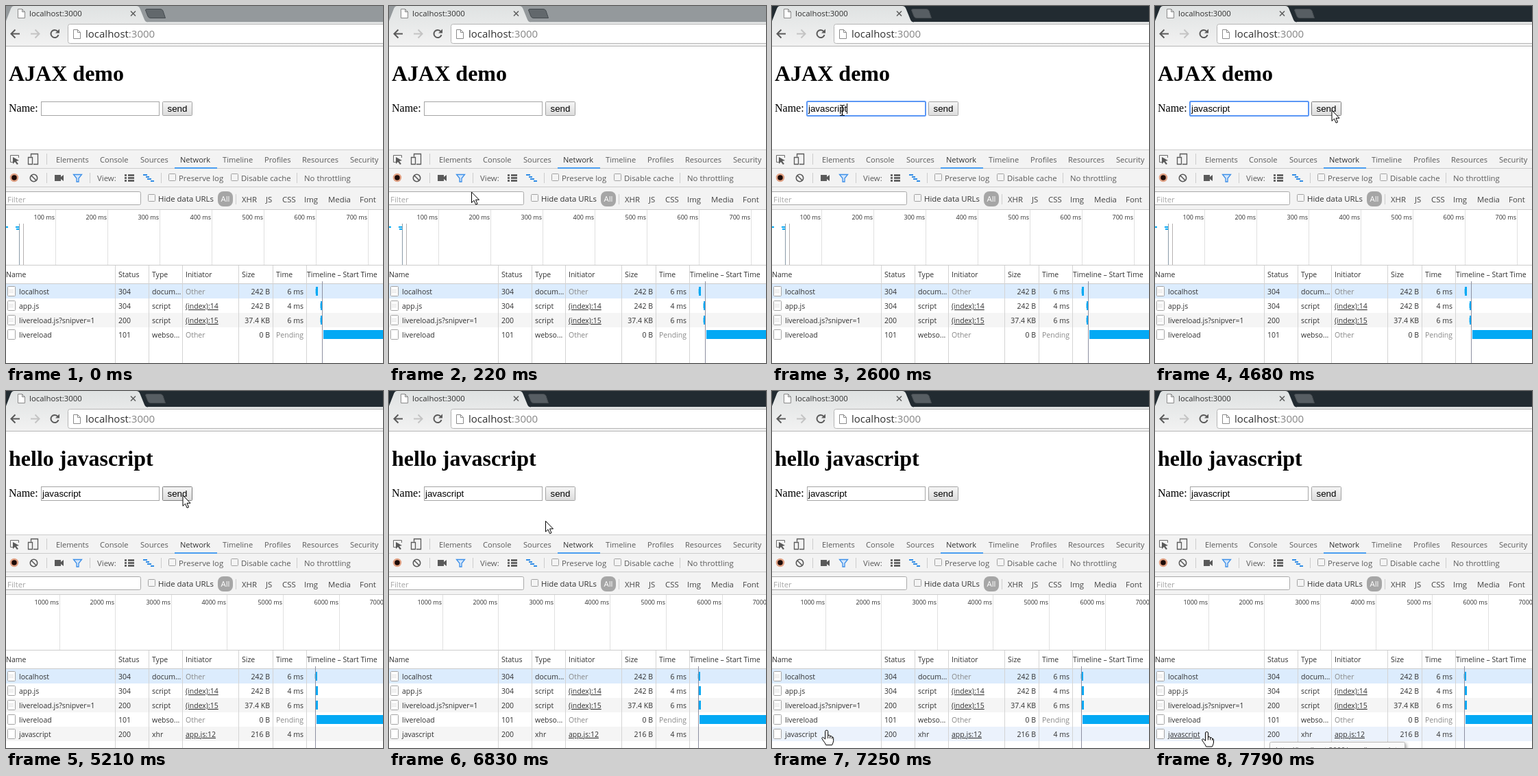
Animation of 550 by 520 pixels, one loop 8000 ms. Source, as an HTML page:

```html
<!DOCTYPE html>
<html lang="en">
<head>
<meta charset="utf-8">
<title>AJAX demo</title>
<style>
html, body { margin: 0; width: 100%; height: 100%; overflow: hidden; background: #fff; }
svg { display: block; width: 550px; height: 520px; }
text { font: 10.5px 'Open Sans', sans-serif; fill: #303030; white-space: pre; }
.tab { font-size: 11.1px; fill: #5a5a5a; }
.tool { font-size: 11.4px; fill: #5a5a5a; }
.tick { font-size: 9px; }
.title { font-size: 11.4px; }
.url { font-size: 15px; }
.serif { font: 16px 'Liberation Serif', serif; fill: #000; }
.heading { font: bold 32px 'Liberation Serif', serif; fill: #000; }
.form { font: 13.333px 'Liberation Sans', sans-serif; fill: #000; }
.end { text-anchor: end; }
.mid { text-anchor: middle; }
.link { text-decoration: underline; }
.dim { fill: #888; }
.tip { filter: drop-shadow(2px 2px 2px #0005); }
</style>
</head>
<body>
<svg id="stage" viewBox="0 0 550 520"></svg>
<script>
const LOOP = 8000, ROW_TOP = 405, ROW_H = 21, BLUE = '#03a9f4';
const WORD = 'javascript';

// Markup helpers
const text = (x, y, s, cls = '', more = '') => `<text x="${x}" y="${y}" class="${cls}" ${more}>${s}</text>`;
const rect = (x, y, w, h, fill, more = '') => `<rect x="${x}" y="${y}" width="${w}" height="${h}" fill="${fill}" ${more}/>`;
const path = (d, stroke, more = 'fill="none"') => `<path d="${d}" stroke="${stroke}" ${more}/>`;
const group = (id, body, more = '') => `<g id="${id}" ${more}>${body}</g>`;
const vline = (x, y1, y2, color) => path(`M${x + .5} ${y1}V${y2}`, color);
const hline = (y, color) => path(`M0 ${y + .5}H550`, color);
const page = (x, y, w, h) => path(`M${x + .5} ${y + .5}h${w - 4}l4 4v${h - 4}h${-w}zm${w - 4} 0v4h4`, '#8a8a8a', 'fill="#fff"');
const checkbox = (x, y) => rect(x + .5, y + .5, 10, 10, '#f4f4f4', 'stroke="#a2a2a2" rx="1"');

function strip(id, back, button) {
  return group(id, rect(0, 0, 550, 24, back) +
    path('M206 4.5H225Q228 4.5 229 7L232.5 17.5H211Q208 17.5 207 15L203.5 6Q203.5 4.5 206 4.5Z', '#454b50', `fill="${button}"`));
}

function browser() {
  return strip('active', '#222b31', '#575e63') + strip('inactive', '#94999c', '#62686c') +
    path('M0 22L7 4Q8.500 0 12 0H190Q194 0 195.500 4L202 20Q203.500 23.500 207 23.500H550V58H0Z', 'none', 'fill="url(#chrome)"') +
    path('M207 23.500H550', '#cfd1d2') + hline(58, '#b6b6b6') +
    page(17, 4, 10, 13) + text(34, 15, 'localhost:3000', 'title') +
    path('M182 7.500l7 7m0-7l-7 7', '#5c5c5c', 'stroke-width="1.500"') +
    path('M20 40.500H8m5.500-6l-6 6 6 6', '#5a5a5a', 'fill="none" stroke-width="2"') +
    path('M36 40.500H48m-5.500-6l6 6-6 6', '#c4c4c4', 'fill="none" stroke-width="2"') +
    path('M75.500 37A5.600 5.600 0 1 0 76.500 42', '#5a5a5a', 'fill="none" stroke-width="2"') +
    path('M78 33.500v6h-6z', 'none', 'fill="#5a5a5a"') +
    rect(90.5, 26.5, 470, 28, '#fff', 'stroke="#b4b4b4" rx="3"') + page(98, 34, 10, 13) +
    text(116, 46, 'localhost<tspan fill="#858585">:3000</tspan>', 'url');
}

function form() {
  return text(4, 109, '', 'heading', 'id="heading"') + text(4, 154, 'Name:', 'serif') +
    rect(51.5, 139.5, 172, 20, '#fff', 'stroke="#a5a5a5"') +
    rect(51, 139, 173, 21, 'none', 'id="focus" stroke="#5b97f5" stroke-width="2" rx="1.500"') +
    text(53, 154, '', 'form', 'id="typed"') + rect(53, 142, 1, 15, '#000', 'id="caret"') +
    rect(228.5, 139.5, 43, 20, 'url(#button)', 'id="send" rx="1"') + text(250, 154, 'send', 'form mid');
}

function toolbars() {
  const tabs = [['Elements', 73], ['Console', 137], ['Sources', 196], ['Network', 254], ['Timeline', 316],
    ['Profiles', 377], ['Resources', 432], ['Security', 502]];
  const filters = [['XHR', 344], ['JS', 379], ['CSS', 403], ['Img', 435], ['Media', 470], ['Font', 516]];
  return rect(0, 209, 550, 88, '#f3f3f3') + [209, 236, 263, 296].map(y => hline(y, '#ccc')).join('') +
    tabs.map(([s, x]) => text(x, 228, s, 'tab', s == 'Network' ? 'style="fill:#333"' : '')).join('') +
    rect(246, 235, 62, 2, '#4a9df0') +
    path('M10 227.500H6.500V217.500H18.500V221', '#6a6a6a') +
    path('M10 220l9 5-4 1 3 4-2 1-3-4-3 3z', 'none', 'fill="#5a5a5a"') +
    path('M36.500 219.500V215.500H46.500V230.500H40M32.500 220.500h6v10h-6z', '#5a5a5a', 'fill="none" stroke-width="1.300"') +
    vline(59, 215, 231, '#ccc') +
    '<circle cx="12" cy="250" r="5" fill="#1c0906" stroke="#e0a184" stroke-width="2.500"/>' +
    '<circle cx="40.500" cy="250.500" r="5.200" fill="none" stroke="#5a5a5a" stroke-width="1.600"/>' +
    path('M37 247l7 7', '#5a5a5a', 'stroke-width="1.600"') +
    [59, 122, 226, 424].map(x => vline(x, 243, 258, '#ccc')).join('') +
    path('M71 246h9v3l4-3v9l-4-3v3h-9z', 'none', 'fill="#5a5a5a"') +
    path('M98.500 245.500h12l-4.500 5.500v5h-3v-5z', '#3d8fe8', 'fill="#d5e7fb" stroke-width="1.300"') +
    text(133, 255, 'View:', 'tool') +
    path('M173 246.500h3m2 0h9m-14 4h3m2 0h9m-14 4h3m2 0h9', '#4f4f4f', 'stroke-width="2.400"') +
    path('M200 246h6m-2 3h5m-3 3h6m-1 3h5', '#2f8be6', 'stroke-width="2"') +
    checkbox(237, 244) + text(252, 255, 'Preserve log', 'tool') +
    checkbox(328, 244) + text(343, 255, 'Disable cache', 'tool') + text(435, 255, 'No throttling', 'tool') +
    rect(-3.5, 270.5, 200, 19, '#fff', 'stroke="#a9a9a9" rx="2"') +
    text(2, 286, 'Filter', 'tool', 'style="fill:#a5a5a5"') +
    checkbox(207, 274) + text(222, 285, 'Hide data URLs', 'tool', 'style="fill:#333"') +
    rect(309, 270, 22, 22, '#a6a6a6', 'rx="8"') + text(320, 285, 'All', 'tool mid', 'style="fill:#fff"') +
    vline(335, 274, 289, '#ccc') + filters.map(([s, x]) => text(x, 286, s, 'tool', 'style="fill:#444"')).join('');
}

function row(i, name, status, type, initiator, size, time) {
  const y = ROW_TOP + ROW_H * i, base = y + 15;
  const lines = i < 3 ? path(`M4 ${y + 8.5}h7m-7 2h7m-7 2h7`, '#e2e2e2') : '';
  return rect(2.5, y + 3.5, 11, 14, '#fff', 'stroke="#a3a3a3" rx="1"') + lines +
    text(19, base, name, 'name') + text(164, base, status) + text(213, base, type) +
    text(262, base, initiator, initiator == 'Other' ? 'dim' : 'link') + text(385, base, size, 'end') +
    text(434, base, time, time == 'Pending' ? 'end dim' : 'end');
}

const rowFill = (i, fill, more) => rect(0, ROW_TOP + ROW_H * i, 550, ROW_H, fill, more);

function table() {
  const heads = [['Name', 0], ['Status', 164], ['Type', 213], ['Initiator', 262], ['Size', 344], ['Time', 394],
    ['Timeline – Start Time', 439]];
  return hline(377, '#ccc') + hline(404, '#ccc') + heads.map(([s, x]) => text(x, 395, s)).join('') +
    rowFill(0, '#dcecfd') + rowFill(2, '#f5f5f5') + group('fifthFill', rowFill(4, '#f5f5f5')) +
    rowFill(0, '#ebf2fc', 'id="hover"') +
    [159, 208, 257, 339, 389, 438].map(x => vline(x, 378, 520, '#d4d4d4')).join('') +
    row(0, 'localhost', 304, 'docum...', 'Other', '242 B', '6 ms') +
    row(1, 'app.js', 304, 'script', '(index):14', '242 B', '4 ms') +
    row(2, 'livereload.js?snipver=1', 200, 'script', '(index):15', '37.4 KB', '6 ms') +
    row(3, 'livereload', 101, 'webso...', 'Other', '0 B', 'Pending') +
    group('fifthRow', row(4, WORD, 200, 'xhr', 'app.js:12', '216 B', '4 ms'));
}

// Overview ruler and waterfall bars for one time scale
function timeline(id, first, gap, unit, load, bars) {
  let out = '';
  for (let n = 1; n < 8; n++) {
    const x = Math.floor(first + gap * (n - 1));
    out += vline(x, 297, 377, '#e0e0e0') + text(x - 1, 311, n * unit + ' ms', 'tick end');
  }
  bars.forEach((x, i) => {
    const y = ROW_TOP + ROW_H * i + 4;
    out += i < 3 ? rect(x, y, 3, 13, BLUE) + rect(x - 1, y + 3, 1, 7, '#8fd6f8') : rect(x, y, 100, 13, BLUE);
  });
  return group(id, out + vline(load, 401, 520, '#8d8fa0'));
}

function tooltip(id, x, y, w, s) {
  return group(id, rect(x + .5, y + .5, w - 1, 24, '#fafafa', 'stroke="#b9b9b9" rx="2"') +
    text(x + 9, y + 16, s, '', 'style="fill:#575757"'), 'class="tip"');
}

function cursors() {
  const outline = 'fill="#fff" stroke-linejoin="round"';
  return group('arrow', path('M.5 .5V16L4 12.700L6.600 18.700L9 17.700L6.500 11.800H11.500Z', '#000', outline)) +
    group('ibeam', path('M-3-7.500H-1L.5-6.500L2-7.500H4M-3 7.500H-1L.5 6.500L2 7.500H4M.5-6.500V6.500', '#000', 'fill="none" stroke-width="1.200"')) +
    group('hand', path('M-2 2Q-2 .5 0 .5T2 2V8Q4.500 6.500 5 9Q7.500 8 8 10.500Q10 10 10 12V16Q9.500 19 8 22H-1Q-2 19-5 15.500L-7 12Q-6 9.500-4 11.500L-2 13.500Z', '#000', outline) +
      path('M2 8v4.500M5 9v3.500M8 10.500v2.500', '#000'));
}

const gradient = (id, a, b) =>
  `<linearGradient id="${id}" x2="0" y2="1"><stop stop-color="${a}"/><stop offset="1" stop-color="${b}"/></linearGradient>`;

const $ = id => document.getElementById(id);
$('stage').innerHTML = `<defs>${gradient('chrome', '#dfe2e2', '#f2f2f2')}${gradient('button', '#f6f6f6', '#dcdcdc')}</defs>` +
  rect(0, 0, 550, 520, '#fff') + browser() + form() + toolbars() + table() +
  timeline('before', 72, 76, 100, 461, [452, 459, 459, 463]) +
  group('marks', rect(0, 321, 3, 2, BLUE) + rect(14, 321, 6, 2, BLUE) + rect(15, 324, 4, 2, BLUE) +
    vline(19, 317, 377, '#8a9aa8') + vline(25, 317, 377, '#b5b0b0')) +
  timeline('after', 78, 81.6, 1000, 451, [451, 452, 452, 453]) +
  tooltip('tipScript', 109, 463, 239, 'http://localhost:35729/livereload.js?snipver=1') +
  tooltip('tipRequest', 167, 511, 198, 'http://localhost:3000/user/javascript') + cursors();
const names = document.querySelectorAll('.name');

// Pointer stops: time, x, y
const stops = [[40, 150, 468], [280, 102, 152], [4220, 102, 152], [4470, 257.5, 151.5], [6790, 257.5, 151.5],
  [6830, 228, 189], [6950, 112, 458], [7030, 108.5, 472], [7150, 88, 489], [7270, 75.5, 496]];

function pointerAt(time) {
  const i = stops.findIndex(s => s[0] > time);
  if (i < 1) return (i ? stops[stops.length - 1] : stops[0]).slice(1);
  const [a, b] = [stops[i - 1], stops[i]], k = (time - a[0]) / (b[0] - a[0]);
  return [1, 2].map(n => a[n] + (b[n] - a[n]) * k);
}

const within = (t, a, b) => t >= a && t < b;
const ramp = (t, a, b) => Math.max(0, Math.min(1, (t - a) / (b - a)));
const show = (id, on) => $(id).setAttribute('visibility', on ? 'visible' : 'hidden');

function typedCount(t) {
  if (t < 1860) return 0;
  if (t < 2420) return Math.min(6, 2 + Math.floor((t - 1860) / 87.5));
  return Math.min(10, 7 + Math.floor((t - 2420) / 60));
}

function render(t) {
  const step = 30 + 40 * Math.floor((t - 30) / 40);
  const [x, y] = pointerAt(step);
  const sent = t >= 5210, pressed = within(t, 5060, 5130);

  show('inactive', t < 320);
  show('focus', within(t, 320, 5060));
  $('heading').textContent = t < 5130 ? 'AJAX demo' : 'hello ' + WORD;
  $('typed').textContent = WORD.slice(0, typedCount(t));
  $('caret').setAttribute('x', Math.floor(53 + $('typed').getComputedTextLength()));
  show('caret', within(t, 360, 1450) || within(t, 1860, 3680) || within(t, 4250, 4680));

  const overSend = within(x, 228, 272) && within(y, 139, 160);
  $('send').setAttribute('stroke', overSend ? '#7d7d7d' : '#a3a3a3');
  $('send').setAttribute('fill', pressed ? '#dadada' : 'url(#button)');

  show('before', !sent);
  show('marks', !sent);
  for (const id of ['after', 'fifthRow', 'fifthFill']) show(id, sent);

  // The row highlight trails the pointer slightly
  const hovered = Math.floor((pointerAt(step - 80)[1] - ROW_TOP) / ROW_H);
  show('hover', t > 6830 && hovered > 0);
  $('hover').setAttribute('y', ROW_TOP + ROW_H * hovered);

  const script = ramp(step, 6910, 7030) * (1 - ramp(step, 7030, 7150));
  const request = ramp(t, 7600, 7790);
  $('tipScript').setAttribute('opacity', script);
  $('tipRequest').setAttribute('opacity', request);
  names[2].classList.toggle('link', script > 0);
  names[4].classList.toggle('link', t >= 7640);

  const kind = within(x, 51, 224) && within(y, 139, 160) ? 'ibeam' : y > ROW_TOP && x < 159 ? 'hand' : 'arrow';
  for (const id of ['arrow', 'ibeam', 'hand']) show(id, t >= 40 && id == kind);
  $(kind).setAttribute('transform', `translate(${x} ${y})`);
}

const start = performance.now();
function frame() {
  render((performance.now() - start) % LOOP);
  requestAnimationFrame(frame);
}
frame();
</script>
</body>
</html>
```
